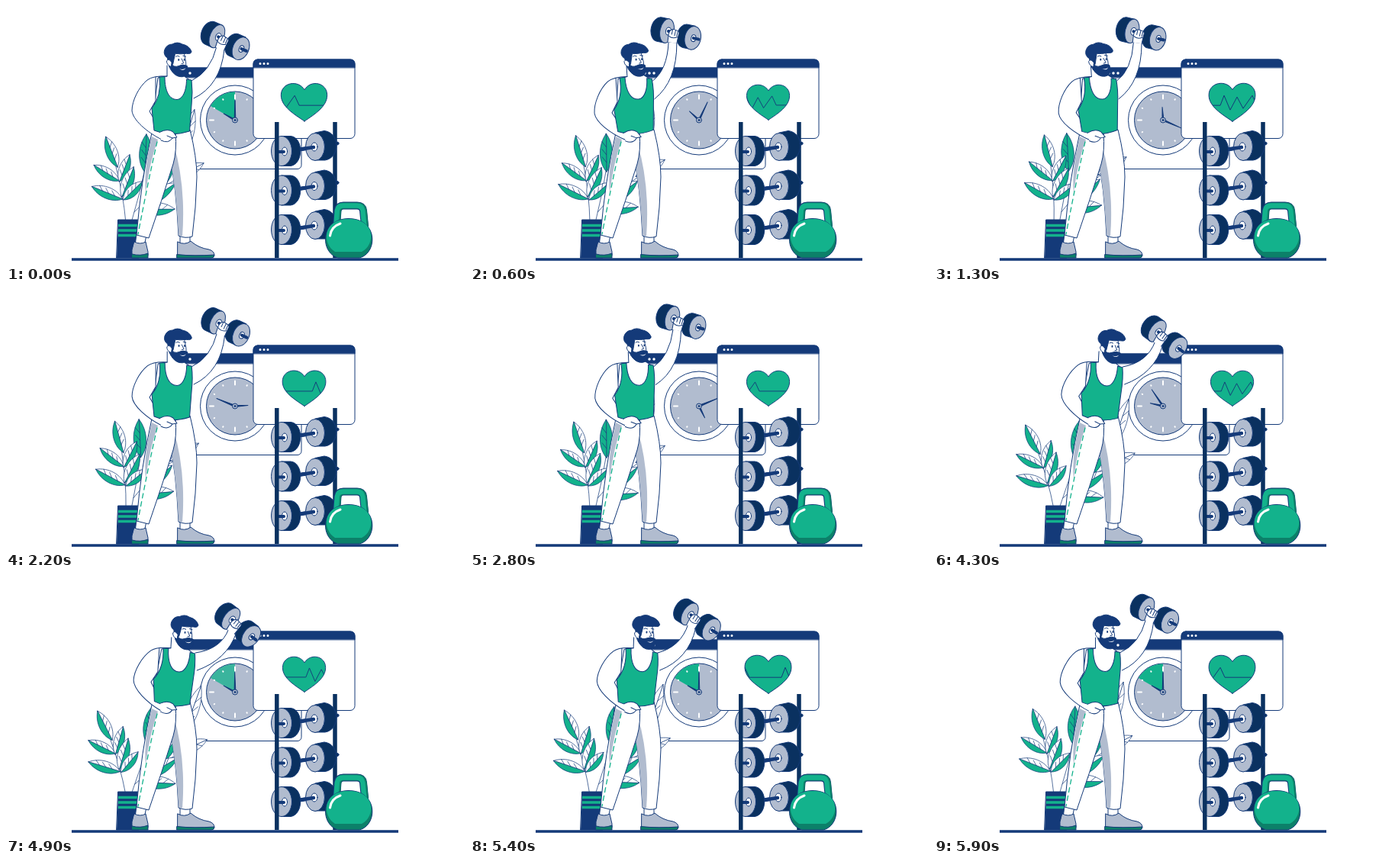
Write an HTML page that moves like this. It is 600x338 px and loops after 6000 ms.

```html
<!DOCTYPE html>
<html lang="en">
<head>
<meta charset="utf-8">
<title>Workout</title>
<style>
  html, body { margin: 0; width: 100%; height: 100%; overflow: hidden; background: #fff; }
  svg { display: block; width: 600px; height: 338px; stroke-linejoin: round; stroke-linecap: round; }
  .line { stroke: #143a79; stroke-width: 1; }
  .thin { stroke-width: .7; }
  .w { fill: #fff; } .n { fill: #143a79; } .d { fill: #0a3160; }
  .g { fill: #13b28c; } .k { fill: #0c8069; } .s { fill: #b1bccf; }
  .none { fill: none; }
</style>
</head>
<body>
<svg viewBox="0 0 600 338">
  <defs>
    <g id="rackBell" class="line">
      <path class="d" d="M384 186L405 183V187L384 190Z"/>
      <path class="d" d="M361 170.500H373C390 172 390 207 373 209.500H361Z"/>
      <ellipse class="s" cx="361" cy="190" rx="13.500" ry="19.500"/>
      <path class="d" d="M405 166L417 163.500C438 166 438 199 418 202L405 202Z"/>
      <ellipse class="s" cx="405" cy="184.500" rx="12.500" ry="18"/>
      <ellipse class="w" cx="404" cy="184.500" rx="4" ry="5.500"/>
      <path d="M387 187.500L403 185" stroke-width="4.500"/>
      <ellipse class="w" cx="365" cy="190.500" rx="3.500" ry="5.500"/>
      <path d="M356 191H364" stroke-width="4"/>
      <circle class="d" cx="434" cy="180" r="2"/>
    </g>
    <path id="heartShape" d="M391 151.500C377 142 360 132 360 117C360 100 383 96 391 110C399 96 421 100 421 117C421 132 405 142 391 151.500Z"/>
    <clipPath id="heartClip"><use href="#heartShape"/></clipPath>
    <path id="handle" d="M433 288L434.500 268Q435.500 261.500 442 261.500H460Q467 261.500 468 268L470 288"/>
  </defs>

  <g class="line">
    <rect class="w" x="222" y="81" width="165" height="132.500" rx="5"/>
    <path class="n" d="M222 93.500V86Q222 81 227 81H382Q387 81 387 86V93.500Z"/>
    <path d="M229 88h0M235 88h0M241 88h0" style="stroke:#fff;stroke-width:3.5"/>
  </g>

  <g class="line" transform="translate(0 -.5)">
    <circle class="w" cx="300" cy="150" r="45.500"/>
    <circle class="s" cx="300" cy="150" r="37.500"/>
    <path id="sector" class="g" stroke="none" d="M300 150V113A37 37 0 0 0 268 131.500Z"/>
    <g id="ticks" style="stroke:#fff;stroke-width:2"></g>
    <path id="hour" class="n" d="M299 150L300 133L301 150Z"/>
    <path id="minute" class="n" d="M299 152L300 124L301 152Z"/>
    <circle class="s" cx="300" cy="150" r="3.500"/>
    <circle class="n" cx="300" cy="150" r="1"/>
  </g>

  <g class="line">
    <rect class="w" x="324" y="70" width="133" height="103.500" rx="6"/>
    <path class="n" d="M324 80.500V76Q324 70 330 70H451Q457 70 457 76V80.500Z"/>
    <path d="M333 75.500h0M338 75.500h0M343 75.500h0" style="stroke:#fff;stroke-width:3"/>
    <g id="heart">
      <use href="#heartShape" class="g"/>
      <g clip-path="url(#heartClip)"><path id="pulse" class="none"/></g>
    </g>
  </g>

  <path d="M431 152V330" stroke="#0a3160" stroke-width="5.500" stroke-linecap="butt"/>
  <use href="#rackBell"/><use href="#rackBell" y="51.500"/><use href="#rackBell" y="103"/>
  <path d="M354.800 152V330" stroke="#0a3160" stroke-width="5.500" stroke-linecap="butt"/>

  <g class="line none">
    <use href="#handle" stroke-width="10"/>
    <use href="#handle" x=".7" style="stroke:#0c8069;stroke-width:8"/>
    <use href="#handle" x="-.7" style="stroke:#13b28c;stroke-width:6.500"/>
  </g>
  <g class="line">
    <path class="k" d="M449 278.500C488 278.500 487 324 463 330H435C411 323 411 278.500 449 278.500Z"/>
    <path class="g" stroke="none" d="M449 279C485 279 484 313 466 322H431C414 312 414 279 449 279Z"/>
    <path class="none" d="M424.500 301Q426 289 438 285" style="stroke:#fff;stroke-width:3"/>
  </g>

  <g class="line">
    <g id="plantBack" class="thin"></g>
    <g id="plantFront" class="thin"></g>
    <path class="n" d="M147 280H178L174 330H145Z"/>
    <path d="M147 287.500H176M147 294H176M147 300.500H175" style="stroke:#13b28c;stroke-width:3.500;stroke-linecap:butt"/>
  </g>

  <path d="M86 332H514" stroke="#143a79" stroke-width="3.500" stroke-linecap="butt"/>

  <g class="line">
    <path class="w" d="M171 298L169 315H181L184 300ZM228 300V314H241V300Z"/>
    <path class="s" d="M168 309Q176 313 183 309L186 322V327H165V320Z"/>
    <path class="k" d="M165 325Q176 328 186 324V330H165Z"/>
    <path class="s" d="M225 309Q234 314 242 308Q252 317 266 319Q273 321 273 327H225Z"/>
    <path class="k" d="M224 325.500Q246 328 273 326Q273 330 269 330H224Z"/>
    <path class="w" d="M212 165L241 162Q250 198 250 224Q249 265 244 302Q235 305 226 301Q223 235 214 195Z"/>
    <path class="s" stroke="none" d="M214 195L219 178Q236 235 231 302L226 300Q223 240 214 195Z"/>
    <path class="w" d="M193 161L222 166Q224 190 219 207Q204 255 187 304L171 300Q177 228 191 166Z"/>
    <path class="s" stroke="none" d="M191 171L199 175Q188 205 183 245Q180 215 191 171Z"/>
    <path class="none" d="M198 178Q186 230 173 299" style="stroke:#13b28c;stroke-width:1.300;stroke-dasharray:6 5"/>
  </g>

  <g class="line">
    <path id="arm" class="w"/>
    <g id="torso">
      <path class="w" d="M211 78V92L199 94L194 132H240L242 98L232 91V80"/>
      <path class="w" d="M211 92Q193 91 185 97C174 106 165 124 165 137C166 149 184 165 204 175L211 166Q198 157 188 138L196 124V93"/>
      <path class="g" d="M201 93L208 92.500C208 112 214 122.500 224 122.500C232 122 236.500 110 236.500 96L243 97Q245 112 243 130L240.500 164Q216 172 194 163L191 134Q204 118 201 93Z"/>
      <path class="w" d="M202 165Q212 160 219 165L224 172L218 173Q213 181 203 176M211 170L218 173"/>
      <g id="head">
        <path class="w" d="M210 66Q213 58 232 60L235 74Q237 88 229 91Q218 91 212 81Z"/>
        <path class="n" d="M212 82L209 69Q203 65 205 58Q208 50 216 50Q223 46 230 50Q240 52 243 60Q243 64 236 63Q226 64 220 63L217 77Z"/>
        <path class="n" d="M214 76Q218 83 225 80Q231 77 237 80Q240 94 230 95Q220 96 213 84Z"/>
        <path class="w" d="M215 75Q211 69 208 73Q208 79 214 81Z"/>
        <path class="w" stroke="none" d="M226 84Q231 86 235 83Q232 88 226 84Z"/>
        <path class="none" d="M221 67Q223 65 226 67M231 66L235 67M229 70L232 76L229 77"/>
        <path d="M225 71v1M233 71v1" style="stroke-width:2"/>
      </g>
    </g>
    <g id="bell">
      <path d="M-14 -1L14 1" style="stroke-width:5"/>
      <path class="d" d="M-11 -17H-21A11 16 0 0 0 -21 15H-11Z"/>
      <ellipse class="s" cx="-11" cy="-1" rx="9" ry="16"/>
      <ellipse class="w" cx="-9" cy="-1" rx="3.500" ry="5"/>
      <path d="M-9 -1L8 0" style="stroke-width:4"/>
      <path class="d" d="M24 -15H14A11 15.500 0 0 0 14 16H24Z"/>
      <ellipse class="s" cx="24" cy="1" rx="10.500" ry="15.500"/>
      <ellipse class="w" cx="25" cy="1" rx="3" ry="4.500"/>
      <path d="M25 1H32" style="stroke-width:4"/>
      <path class="w" d="M-7 13L-8 3Q-8 -4 -3 -5L3 -4Q6 -3 5 1V12"/>
      <path class="none" d="M-4 -4V2M0 -4V3M3 -3V3M-7 5Q-2 8 4 4"/>
    </g>
  </g>
</svg>
<script>
const LOOP = 6000, TAU = Math.PI * 2;
const el = id => document.getElementById(id);
const set = (id, name, value) => el(id).setAttribute(name, value);
const turn = (id, deg, x, y) => set(id, 'transform', `rotate(${deg} ${x} ${y})`);

// Leaf from base to tip; each half has its own fill, veins lie on a white half.
function leaf([x, y, tx, ty, w], right = 'w', left = 'g') {
  const dx = tx - x, dy = ty - y, len = Math.hypot(dx, dy);
  const at = (along, side) =>
    `${x + dx * along - dy / len * w * side} ${y + dy * along + dx / len * w * side}`;
  const half = (side, cls) =>
    `<path class="${cls}" d="M${x} ${y}C${at(.25, side)} ${at(.7, side)} ${tx} ${ty}Z"/>`;
  const veinSide = right === 'w' ? .5 : -.5;
  const veins = [.25, .45, .65].map(k => `M${at(k, 0)}L${at(k + .14, veinSide)}`).join('');
  return half(1, right) + half(-1, left) + `<path d="${veins}"/>`;
}

el('plantFront').innerHTML = '<path class="none" d="M157 284Q154 245 144 207"/>' +
  leaf([147, 211, 132, 171, 10]) + leaf([149, 229, 116, 208, 9]) +
  leaf([153, 253, 113, 236, 10]) + leaf([149, 230, 163, 195, 9], 'g', 'w') +
  leaf([152, 250, 168, 211, 10], 'g', 'w') + leaf([154, 254, 179, 230, 9], 'g', 'w');

el('plantBack').innerHTML = '<path class="none" d="M164 284Q176 245 184 205M168 270Q190 245 228 224"/>' +
  leaf([182, 218, 184, 168, 11], 'g') + leaf([190, 245, 221, 205, 11], 'g', 'w') +
  leaf([228, 200, 247, 136, 11], 'w', 'w') + leaf([220, 226, 259, 206, 10], 'w', 'w') +
  leaf([180, 260, 222, 232, 11], 'g', 'w') + leaf([176, 266, 221, 266, 11], 'g', 'w');

for (let i = 0; i < 12; i++)
  el('ticks').innerHTML += `<path d="M300 ${i % 3 ? 118.5 : 117}V${i % 3 ? 119 : 122}" transform="rotate(${i * 30} 300 150)"/>`;

// Smooth periodic curve through [time, value] keys, flat at each extreme.
function curve(keys, t) {
  const n = keys.length;
  const key = i => {
    const [time, value] = keys[(i + n) % n];
    return [time + LOOP * Math.floor(i / n), value];
  };
  const slope = i => {
    const [a, b, c] = [key(i - 1), key(i), key(i + 1)];
    return (b[1] - a[1]) * (c[1] - b[1]) <= 0 ? 0 : (c[1] - a[1]) / (c[0] - a[0]);
  };
  let i = 0;
  while (key(i + 1)[0] <= t) i++;
  const [t0, v0] = key(i), [t1, v1] = key(i + 1), d = t1 - t0, u = (t - t0) / d;
  return v0 + (v1 - v0) * u * u * (3 - 2 * u) +
    d * (slope(i) * u * (1 - u) ** 2 - slope(i + 1) * u * u * (1 - u));
}

const leanKeys = [[0, 0], [900, -22], [2100, 1], [3100, -14], [4600, 18]];
// Poses for leaning back, level and forward: arm outline, bell centre, bell angle.
const poses = [
  [239, 98, 257, 84, 257, 47, 268, 47, 269, 97, 241, 122, 265, 35, 10],
  [243, 98, 268, 86, 276, 53, 286, 57, 281, 104, 246, 121, 286, 45, 24],
  [248, 98, 281, 93, 291, 66, 301, 71, 289, 107, 250, 121, 302, 60, 37]
];

function drawMan(t) {
  const p = curve(leanKeys, t);
  const k = [p * (p - 16) / 777, (p + 21) * (16 - p) / 336, p * (p + 21) / 592];
  const v = poses[0].map((_, i) => poses.reduce((sum, pose, j) => sum + pose[i] * k[j], 0));
  const at = i => `${v[i]} ${v[i + 1]}`;
  set('arm', 'd', `M${at(0)}Q${at(2)} ${at(4)}L${at(6)}Q${at(8)} ${at(10)}`);
  set('bell', 'transform', `translate(${at(12)}) rotate(${v[14]})`);
  turn('torso', p * .22, 216, 168);
  set('head', 'transform', `translate(${17 + p * .12} 2.5) scale(.93 .95)`);
}

function drawClock(t) {
  const e = .5 - .5 * Math.cos(Math.PI * Math.min(t / 5000, 1));
  turn('hour', 300 + 360 * e, 300, 150);
  turn('minute', 720 * e, 300, 150);
  const show = t < 2500 ? 1 - t / 400 : (t - 4600) / 400;
  set('sector', 'opacity', Math.max(0, Math.min(1, show)));
}

const beat = [[-5, 0], [0, -13], [8, 6], [17, -11], [25, 4], [37, -13], [43, 0]];

function drawHeart(t) {
  const size = .96 + .04 * Math.tanh(3 * Math.cos(TAU * (t / 2000 - .8)));
  set('heart', 'transform', `translate(391 126.700) scale(${size}) translate(-391 -127)`);
  const first = 341 + t * .03 % 90;
  const points = [-90, 0, 90].flatMap(o => beat.map(([x, y]) => `${first + o + x} ${130.5 + y}`));
  set('pulse', 'd', 'M' + points.join('L'));
}

function draw() {
  const t = Math.floor(performance.now() / 100) * 100 % LOOP;
  drawMan(t);
  drawClock(t);
  drawHeart(t);
  turn('plantFront', 6.5 * Math.sin(TAU * t / LOOP - .1), 156, 285);
  turn('plantBack', 4.5 * Math.cos(TAU * (t - 4700) / LOOP) - 1, 165, 282);
  requestAnimationFrame(draw);
}
draw();
</script>
</body>
</html>
```
